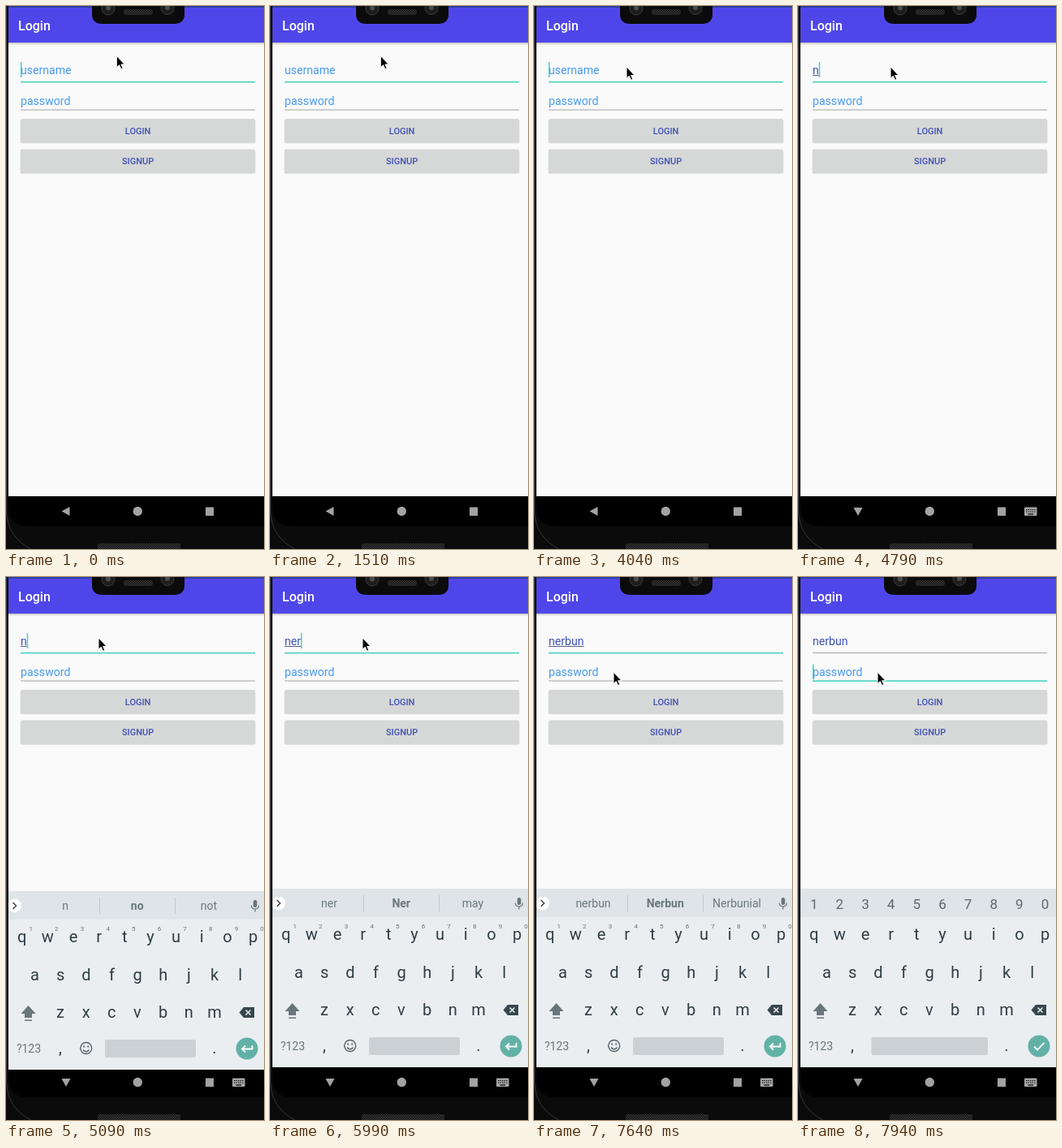
An HTML page for the animation above (8000 ms loop, 318 by 669 pixels).

```html
<!DOCTYPE html>
<html lang="en">
<head>
<meta charset="utf-8">
<title>Login screen</title>
<style>
html, body { margin: 0; width: 100%; height: 100%; overflow: hidden; background: #0b0b0c; }
svg { display: block; width: 318px; height: 669px; font-family: Roboto, sans-serif; }
.mid { text-anchor: middle; }
.field { font-size: 14.1px; }
.btn { font-size: 11px; font-weight: 500; fill: #3f51b5; text-anchor: middle; }
.key { font-size: 20px; fill: #2f3d44; text-anchor: middle; }
.sup { font-size: 8px; fill: #66737a; text-anchor: middle; }
.word { font-size: 14px; fill: #6b777d; text-anchor: middle; }
.num { font-size: 17px; fill: #5d686e; text-anchor: middle; }
</style>
</head>
<body>
<svg viewBox="0 0 318 669">
  <defs>
    <pattern id="mesh" width="3" height="3" patternUnits="userSpaceOnUse">
      <rect width="3" height="3" fill="#161616"/>
      <circle cx="1" cy="1" r=".7" fill="#555"/>
      <circle cx="2.5" cy="2.5" r=".6" fill="#444"/>
    </pattern>
    <linearGradient id="shade" x2="0" y2="1">
      <stop stop-color="#000" stop-opacity=".25"/>
      <stop offset="1" stop-color="#000" stop-opacity="0"/>
    </linearGradient>
    <clipPath id="screen"><path d="M3 0H318V641H27Q3 641 3 617Z"/></clipPath>
  </defs>

  <rect width="318" height="669" fill="#0b0b0c"/>
  <path d="M.5 0V622Q2 655 31 669" fill="none" stroke="#38383a"/>
  <rect x="113" y="662" width="102" height="9" rx="2" fill="url(#mesh)"/>

  <g clip-path="url(#screen)">
    <rect x="3" width="315" height="604" fill="#fafafa"/>
    <rect x="3" width="315" height="45" fill="#4f46ea"/>
    <rect x="3" width="315" height="2" fill="#303f9f"/>
    <rect x="3" y="45" width="315" height="3" fill="url(#shade)"/>
    <text x="15" y="30" font-size="16" font-weight="500" fill="#fff">Login</text>

    <text id="user" class="field" x="18" y="84"></text>
    <rect id="compose" x="18" y="85" height="1" fill="#555d86"/>
    <text class="field" x="18" y="122" fill="#469af3">password</text>
    <rect id="line0" x="18" width="289"/>
    <rect id="line1" x="18" width="289"/>
    <rect id="caret" width="1.4" height="19" fill="#3ccfc0"/>
    <g id="buttons"></g>

    <rect x="3" y="604" width="315" height="38" fill="#000"/>
    <g fill="#a3a3a3">
      <path id="back"/>
      <circle cx="162.3" cy="622.5" r="5.7"/>
      <rect x="246" y="617.5" width="10" height="10.5"/>
      <g id="imeIcon">
        <rect x="279" y="617.5" width="15.5" height="10.5" rx="1"/>
        <path d="M281 620.5H293M281 623H293" stroke="#000" stroke-width="1.2" stroke-dasharray="1.4 1.1"/>
        <path d="M283.500 626H290" stroke="#000" stroke-width="1.2"/>
      </g>
    </g>

    <g id="board">
      <rect x="3" y="384" width="315" height="220" fill="#eaeef1"/>
      <rect x="3" y="384" width="315" height="35" fill="#dee4e7"/>
      <g id="letters"></g>
      <g id="strip">
        <path d="M115.500 392V412M208.500 392V412" stroke="#c3cacd"/>
        <circle cx="10.500" cy="402" r="8.500" fill="#fff"/>
        <path d="M8.500 398L12.500 402L8.500 406" fill="none" stroke="#444" stroke-width="1.5"/>
        <rect x="304.800" y="395" width="4.600" height="9" rx="2.300" fill="#68757b"/>
        <path d="M302.500 401.500Q302.500 406 307 406T311.500 401.500M307 406V409.500" fill="none" stroke="#68757b" stroke-width="1.200"/>
      </g>
      <g id="digits"></g>
      <path d="M27.500 525L36.500 535H32V540H23V535H18.500Z" fill="#68757b"/>
      <rect x="23" y="542.500" width="9" height="1.500" fill="#68757b"/>
      <path d="M287.500 533.500L293 527H306V540H293Z" fill="#37464d"/>
      <path d="M295.500 530.500L301.500 536.500M301.500 530.500L295.500 536.500" stroke="#eaeef1" stroke-width="1.500"/>
      <text class="mid" x="28" y="583" font-size="14" fill="#68757b">?123</text>
      <text class="key" x="67" y="584">,</text>
      <text class="key" x="257" y="584">.</text>
      <g id="smile" fill="none" stroke="#56636a" stroke-width="1.400">
        <circle cx="98.700" cy="577.500" r="7"/>
        <path d="M95 579.500Q98.700 584 102.400 579.500"/>
        <path d="M96.200 574.500V576.500M101.200 574.500V576.500" stroke-width="1.800"/>
      </g>
      <rect id="space" y="567" height="22" rx="2" fill="#cbd0d4"/>
      <circle cx="297" cy="578" r="13.500" fill="#62b1a7"/>
      <path id="enter" fill="none" stroke="#fff" stroke-width="1.800"/>
    </g>
  </g>

  <path d="M106 0V10Q106 22 119 22H207Q220 22 220 10V0Z" fill="#0b0b0c"/>
  <g fill="#1d1d1e" stroke="#3b3b3c">
    <circle cx="126" cy="3" r="8"/><circle cx="199" cy="2.500" r="8"/>
  </g>
  <g fill="#4b4b4d">
    <circle cx="126" cy="2.500" r="3"/><circle cx="199" cy="2" r="3"/>
  </g>
  <rect x="145" y="4" width="36" height="7" rx="3" fill="url(#mesh)"/>

  <path id="mouse" d="M0 0V14.200L3.300 11.200L5.500 16.200L7.800 15.200L5.600 10.400H10Z" fill="#000" stroke="#fff" stroke-width="1"/>
</svg>

<script>
const LOOP = 8000;
const NS = 'http://www.w3.org/2000/svg';
const $ = id => document.getElementById(id);

function add(parent, tag, attrs, text = '') {
  const el = document.createElementNS(NS, tag);
  set(el, attrs);
  el.textContent = text;
  return parent.appendChild(el);
}
function set(el, attrs) {
  for (const k in attrs) el.setAttribute(k, attrs[k]);
}
function show(el, on) {
  el.style.display = on ? '' : 'none';
}

// Static rows
[['LOGIN', 139], ['SIGNUP', 176.5]].forEach(([label, y]) => {
  const g = $('buttons');
  add(g, 'rect', { x: 17.5, y: y + 1, width: 290, height: 29.2, rx: 2, fill: '#000', opacity: .12 });
  add(g, 'rect', { x: 18, y, width: 289, height: 29, rx: 1.5, fill: '#d6d8d7' });
  add(g, 'text', { class: 'btn', x: 162.6, y: y + 18.5 }, label);
});

[['qwertyuiop', 19.7, 447], ['asdfghjkl', 35.5, 494], ['zxcvbnm', 67, 540]].forEach(([row, x, y]) =>
  [...row].forEach((c, i) => add($('letters'), 'text', { class: 'key', x: x + i * 31.65, y }, c)));

const sups = add($('letters'), 'g', {});
[...'1234567890'].forEach((d, i) => {
  const x = 19.7 + i * 31.65;
  add(sups, 'text', { class: 'sup', x: x + 11, y: 433 }, d);
  add($('digits'), 'text', { class: 'num', x, y: 409 }, d);
});
const words = [73, 161.7, 250].map((x, i) =>
  add($('strip'), 'text', { class: 'word', x, y: 407, 'font-weight': i === 1 ? 700 : 400 }));

// Timelines: [start, value...]
const typed = [
  [0, '', ''],
  [4790, 'n', 'n no not'],
  [5240, 'ne', 'ne new next'],
  [5990, 'ner', 'ner Ner may'],
  [6140, 'nerb', 'nerb Nerbun Nerbunial'],
  [6290, 'nerbu', 'nerbu Nerbun Nerbunial'],
  [6440, 'nerbun', 'nerbun Nerbun Nerbunial']
];
const pointer = [
  [0, 136.3, 61.5], [3140, 131, 63.5], [3290, 121, 69.5], [3440, 114, 75],
  [7040, 113, 79], [7190, 109, 90], [7340, 104, 103], [7490, 99.5, 113], [7640, 98, 117.3]
];
const blinks = [450, 1050, 1510, 1940, 2540, 2990, 3440, 4040, 4490, 4790,
  5540, 5990, 6590, 6890, 7490, 7790];
const at = (list, t) => list.filter(s => s[0] <= t).pop();

function drawLine(el, y, focused) {
  set(el, focused
    ? { y: y - .7, height: 1.6, fill: '#46d2c3' }
    : { y: y - .5, height: 1, fill: '#a4a4a4' });
}

function draw(t) {
  const [, name, hints] = at(typed, t);
  const [, mx, my] = at(pointer, t);
  const onPass = t >= 7790, passKeys = t >= 7940, ime = t >= 4790;

  const user = $('user');
  user.textContent = name || 'username';
  set(user, { fill: name ? '#3f51b5' : '#469af3' });
  const width = name ? user.getComputedTextLength() : 0;
  show($('compose'), name && !onPass);
  set($('compose'), { width });

  drawLine($('line0'), 93.5, !onPass);
  drawLine($('line1'), 128, onPass);
  show($('caret'), blinks.filter(b => b <= t).length % 2 === 0);
  set($('caret'), { x: 18 + (onPass ? 0 : width), y: onPass ? 107.5 : 69 });

  show($('imeIcon'), ime);
  set($('back'), { d: ime ? 'M68.500 618H79.500L74 628Z' : 'M68.500 622.500L78.500 617V628Z' });

  show($('board'), t >= 5090);
  set($('board'), { transform: `translate(0 ${t < 5240 ? 3 : 0})` });
  hints.split(' ').forEach((w, i) => words[i].textContent = w);
  show($('strip'), !passKeys);
  show(sups, !passKeys);
  show($('smile'), !passKeys);
  show($('digits'), passKeys);
  const left = passKeys ? 90.5 : 122;
  set($('space'), { x: left, width: 234 - left });
  set($('enter'), { d: passKeys
    ? 'M291 578.500L295 582.500L303.500 574'
    : 'M303.500 574V578.500H291.500M295 574.500L291 578.500L295 582.500' });

  set($('mouse'), { transform: `translate(${mx} ${my})` });
}

const start = performance.now();
function tick() {
  draw((performance.now() - start) % LOOP);
  requestAnimationFrame(tick);
}
tick();
</script>
</body>
</html>
```
